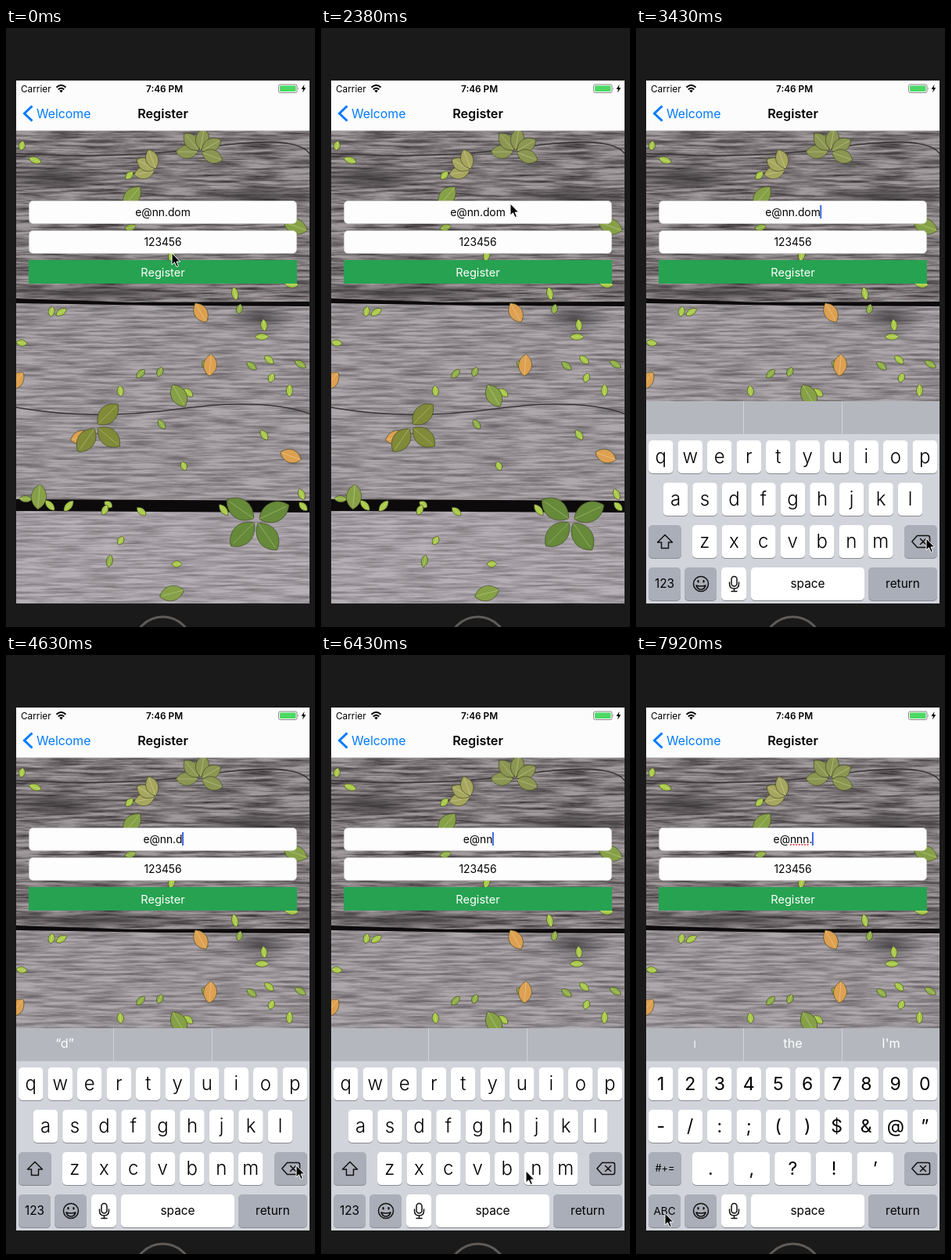
An HTML page that plays this animation: 395 px wide and 764 px high, repeating every 8000 ms.

```html
<!DOCTYPE html>
<html lang="en">
<head>
<meta charset="utf-8">
<title>Register form</title>
<style>
html, body { margin: 0; width: 100%; height: 100%; overflow: hidden; background: #1a1a1a; }
svg { display: block; font-family: Inter, Roboto, sans-serif; }
.mid { text-anchor: middle; }
#letters { font-weight: 300; }
#letters .label, #common { font-weight: 400; }
</style>
</head>
<body>
<svg width="395" height="764" viewBox="0 0 395 764">
  <defs>
    <clipPath id="screen"><rect x="13" y="67" width="375" height="667"/></clipPath>
    <filter id="grain" x="0" y="0" width="100%" height="100%" color-interpolation-filters="sRGB">
      <feTurbulence type="fractalNoise" baseFrequency=".02 .32" numOctaves="5" seed="4"/>
      <feColorMatrix values="0 0 0 0 .16  0 0 0 0 .14  0 0 0 0 .15  1.9 0 0 0 -.6"/>
    </filter>
    <radialGradient id="knot"><stop stop-color="#2b2729" stop-opacity=".7"/><stop offset="1" stop-color="#2b2729" stop-opacity="0"/></radialGradient>
  </defs>
  <circle cx="200.500" cy="788.500" r="37.500" fill="none" stroke="#5f5b58" stroke-width="3"/>
  <g clip-path="url(#screen)">
    <g id="planks"></g>
    <g fill="url(#knot)">
      <ellipse cx="325" cy="370" rx="45" ry="18"/><ellipse cx="60" cy="190" rx="80" ry="18"/>
      <ellipse cx="320" cy="215" rx="90" ry="14"/><ellipse cx="120" cy="338" rx="130" ry="12"/>
    </g>
    <path d="M13 345L160 350L388 349V355L200 354L13 351ZM13 601L388 603V618L13 616Z" fill="#0c0a0b"/>
    <path d="M13 484Q110 501 220 486T388 492M13 160Q150 168 260 152T388 160" fill="none" stroke="#393436" stroke-width="1.500"/>
    <g id="leaves"></g>

    <rect x="13" y="67" width="375" height="64" fill="#fcfcfc"/>
    <path d="M13 131H388" stroke="#b5b5b5" stroke-width=".6"/>
    <text x="19" y="81.500" font-size="11.800">Carrier</text>
    <path d="M64.500 75.800Q70.500 70.200 76.500 75.800M66.800 78.400Q70.500 75 74.200 78.400" fill="none" stroke="#000" stroke-width="2"/>
    <path d="M68.300 80Q70.500 78.200 72.700 80L70.500 82.400Z"/>
    <text class="mid" x="202.500" y="81.500" font-size="11.800" font-weight="600">7:46 PM</text>
    <rect x="348.500" y="72" width="23.500" height="10.500" rx="2" fill="none" stroke="#888"/>
    <rect x="350" y="73.500" width="20.500" height="7.500" rx="1" fill="#4cd964"/>
    <path d="M373.300 75.500Q375 77.200 373.300 79Z" fill="#888"/>
    <path d="M381.500 72L377.500 78H380L379 82.500L383.300 76.300H380.700Z"/>
    <path d="M33.500 99.500L23.500 109L33.500 118.500" fill="none" stroke="#007aff" stroke-width="3"/>
    <text x="39" y="115" font-size="15.800" fill="#007aff">Welcome</text>
    <text class="mid" x="200.500" y="115" font-size="16.200" font-weight="600">Register</text>

    <g fill="#fdfdfd" stroke="#ccc" stroke-width=".6">
      <rect x="29.500" y="220.500" width="342" height="29" rx="5"/>
      <rect x="29.500" y="258.500" width="342" height="29" rx="5"/>
    </g>
    <rect x="29" y="296" width="343" height="30" fill="#26a251"/>
    <g class="mid" font-size="13.800">
      <text id="mail" x="200.500" y="239.500"></text>
      <text x="200.500" y="277.500">123456</text>
      <text x="200.500" y="316.500" font-size="14.600" fill="#fff">Register</text>
    </g>
    <path id="typo" fill="none" stroke="#e8403a" stroke-width="2.200" stroke-linecap="round" stroke-dasharray="0 3.600"/>
    <rect id="caret" y="226" width="2" height="17" fill="#3f66dc"/>

    <g id="keyboard">
      <rect x="13" y="476" width="375" height="258" fill="#d1d4da"/>
      <rect x="13" y="476" width="375" height="42" fill="#b4b8be"/>
      <path d="M137.500 476V518M263.500 476V518" stroke="#d0d3d8"/>
      <g id="hints" class="mid" fill="#fff" font-size="16.200">
        <text x="75" y="501"></text><text x="200.500" y="501"></text><text x="326" y="501"></text>
      </g>
      <g id="letters" class="mid"></g>
      <g id="numbers" class="mid"></g>
      <g id="common" class="mid"></g>
      <g fill="none" stroke="#111" stroke-width="1.500" stroke-linejoin="round" stroke-linecap="round">
        <path d="M359.500 647.500H373Q375.500 647.500 375.500 650V660Q375.500 662.500 373 662.500H359.500L352.800 655ZM363.500 651.500L370.500 658.500M370.500 651.500L363.500 658.500"/>
        <circle cx="83" cy="709" r="9.500"/>
        <path d="M77 711Q83 713 89 711Q87.500 716 83 716T77 711Z"/>
        <path d="M79.500 705V706.500M86.500 705V706.500" stroke-width="2.200"/>
        <rect x="122" y="699.500" width="7" height="12.500" rx="3.500"/>
        <path d="M119.500 707V709Q119.500 715 125.500 715T131.500 709V707M125.500 715V718.500M122 718.500H129"/>
      </g>
    </g>
  </g>
  <path id="cursor" d="M0 0V15L3.500 11.800L6 17.500L8.400 16.500L6 11H10.600Z" stroke="#fff"/>
</svg>
<script>
const $ = id => document.getElementById(id);

// Wooden planks with fallen leaves
const plank = (y, h, fill, grain) =>
  `<rect x="13" y="${y}" width="375" height="${h}" fill="${fill}"/>` +
  `<rect x="13" y="${y}" width="375" height="${h}" filter="url(#grain)" opacity="${grain}"/>`;
$('planks').innerHTML = plank(131, 219, '#a19a9c', .85) + plank(350, 255, '#aea8ac', .5) + plank(605, 129, '#b7b1b7', .4);

const leaf = (x, y, r, angle, fill, w = r * .8) =>
  `<g transform="translate(${x} ${y}) rotate(${angle})"><path fill="${fill}" stroke="#3c4420" stroke-width=".6" ` +
  `d="M${-r} 0C${-r / 2} ${-w} ${r / 2} ${-w} ${r} 0C${r / 2} ${w} ${-r / 2} ${w} ${-r} 0"/>` +
  `<path d="M${-r} 0H${r * .8}" stroke="#ffffc0" stroke-width=".8" opacity=".35"/></g>`;

// Leaves spread around one stem
function fan(x, y, count, r, from, turn, fill) {
  return Array.from({ length: count }, (_, i) => {
    const angle = from + i * turn, a = angle * Math.PI / 180;
    return leaf(x + r * 1.2 * Math.cos(a), y + r * 1.2 * Math.sin(a), r, angle, fill);
  }).join('');
}

let seed = 11;
const random = () => (seed = seed * 16807 % 2147483647) / 2147483647;
const scatter = (count, fill) => Array.from({ length: count }, () =>
  leaf(20 + random() * 360, 138 + random() * 590, 6 + random() * 3, random() * 180, fill, 5.5)).join('');
const place = (points, r, fill) => points.map(([x, y], i) => leaf(x, y, r, 60 + i * 35, fill)).join('');

$('leaves').innerHTML =
  scatter(32, '#a8c84a') + scatter(12, '#8fae48') +
  place([[221, 469], [42, 598], [161, 215], [212, 721], [370, 253]], 16, '#86a048') +
  place([[249, 363], [261, 430], [13, 450], [96, 522], [364, 546]], 14, '#dda052') +
  fan(192, 182, 3, 13, 170, 40, '#a6a660') + fan(248, 158, 5, 14, 180, 50, '#8b9653') +
  fan(115, 508, 3, 18, -45, 85, '#808a38') + fan(320, 628, 4, 21, -25, 80, '#66893a');

// Keyboard
const GREY = '#a9aeb8';
const key = (x, y, w, label = '', size = 15.4, fill = GREY) =>
  `<rect x="${x}" y="${y + 1}" width="${w}" height="42" rx="5" fill="#898c92"/>` +
  `<rect x="${x}" y="${y}" width="${w}" height="42" rx="5" fill="${fill}"/>` +
  `<text class="${fill === GREY ? 'label' : ''}" x="${x + w / 2}" y="${y + 21 + size * .34}" font-size="${size}">${label}</text>`;
const row = (chars, x, y, size, w = 31.5) =>
  [...chars].map((c, i) => key(x + i * (w + 6), y, w, c, size, '#fff')).join('');

$('letters').innerHTML = row('qwertyuiop', 16, 526, 24) + row('asdfghjkl', 34.75, 580, 24) + row('zxcvbnm', 72, 634, 24) +
  key(16, 634, 42) + key(16, 688, 41, '123') +
  '<path d="M37 646.500L46.500 656H41.500V663.500H32.500V656H27.500Z" fill="none" stroke="#111" stroke-width="1.500" stroke-linejoin="round"/>';
$('numbers').innerHTML = row('1234567890', 16, 526, 23) + row('-/:;()$&@”', 16, 580, 23) +
  row('.,?!’', 72, 634, 23, 46.6) + key(16, 634, 42, '#+=', 12.8) + key(16, 688, 41, 'ABC', 13.5);
$('common').innerHTML = key(343, 634, 42) + key(62, 688, 41) + key(109, 688, 32, '', 15, '#fff') +
  key(147, 688, 145, 'space', 15.4, '#fff') + key(297, 688, 88, 'return');

const FOCUS = 2390, NUMBERS = 6880;

// Time, field text, suggestions
const edits = [
  [0, 'e@nn.dom', []], [3730, 'e@nn.do', ['“do”']], [4330, 'e@nn.d', ['“d”']],
  [5080, 'e@nn', []], [6580, 'e@nnn', ['“nnn”']], [7480, 'e@nnn.', ['I', 'the', 'I\'m']]];

// Pointer moves: start, end, x, y
const moves = [
  [0, 0, 212, 287], [140, 890, 29, 46], [890, 1040, 41, 115], [1640, 2380, 263, 235],
  [2680, 3430, 371, 651], [5230, 5680, 247, 683], [5680, 6280, 262, 658],
  [6580, 6880, 42, 695], [7030, 7330, 93, 655], [7480, 7920, 37, 712]];

function pointer(t) {
  let x = 0, y = 0;
  for (const [start, end, toX, toY] of moves) {
    if (t < start) break;
    const k = t >= end ? 1 : (t - start) / (end - start), ease = k * k * (3 - 2 * k);
    x += (toX - x) * ease;
    y += (toY - y) * ease;
  }
  return `translate(${Math.round(x)} ${Math.round(y)})`;
}

function step(t) {
  if (t < 140) return 0;
  if (t >= 7920) return 7920;
  const start = t < 2680 ? 140 : 2680;
  return start + Math.floor((t - start) / 150) * 150;
}

function draw(t) {
  $('cursor').setAttribute('transform', pointer(t));

  const [since, text, hints] = edits.findLast(e => e[0] <= t);
  const mail = $('mail');
  mail.textContent = text;
  const width = mail.getComputedTextLength(), left = 200.5 - width / 2;
  const blink = (t - Math.max(since, FOCUS)) % 1000;
  $('caret').setAttribute('x', left + width - .5);
  $('caret').style.display = t > FOCUS && blink < 500 ? '' : 'none';

  const wrong = text.endsWith('.');
  if (wrong) $('typo').setAttribute('d',
    `M${left + mail.getSubStringLength(0, 2) + 1} 242h${mail.getSubStringLength(2, 3) - 1}`);
  $('typo').style.display = wrong ? '' : 'none';

  [...$('hints').children].forEach((el, i) => {
    el.textContent = hints[i] || '';
    el.setAttribute('font-size', hints[i] === 'I' ? 12 : 16.2);
  });

  const drop = t < 2830 ? 258 * Math.exp(-Math.max(0, t - FOCUS) / 86) : 0;
  $('keyboard').setAttribute('transform', `translate(0 ${Math.round(drop)})`);
  $('letters').style.display = t < NUMBERS ? '' : 'none';
  $('numbers').style.display = t < NUMBERS ? 'none' : '';
}

let shown = -1;
const begin = performance.now();
function tick() {
  const t = step((performance.now() - begin) % 8000);
  if (t !== shown) draw(shown = t);
  requestAnimationFrame(tick);
}
tick();
</script>
</body>
</html>
```
